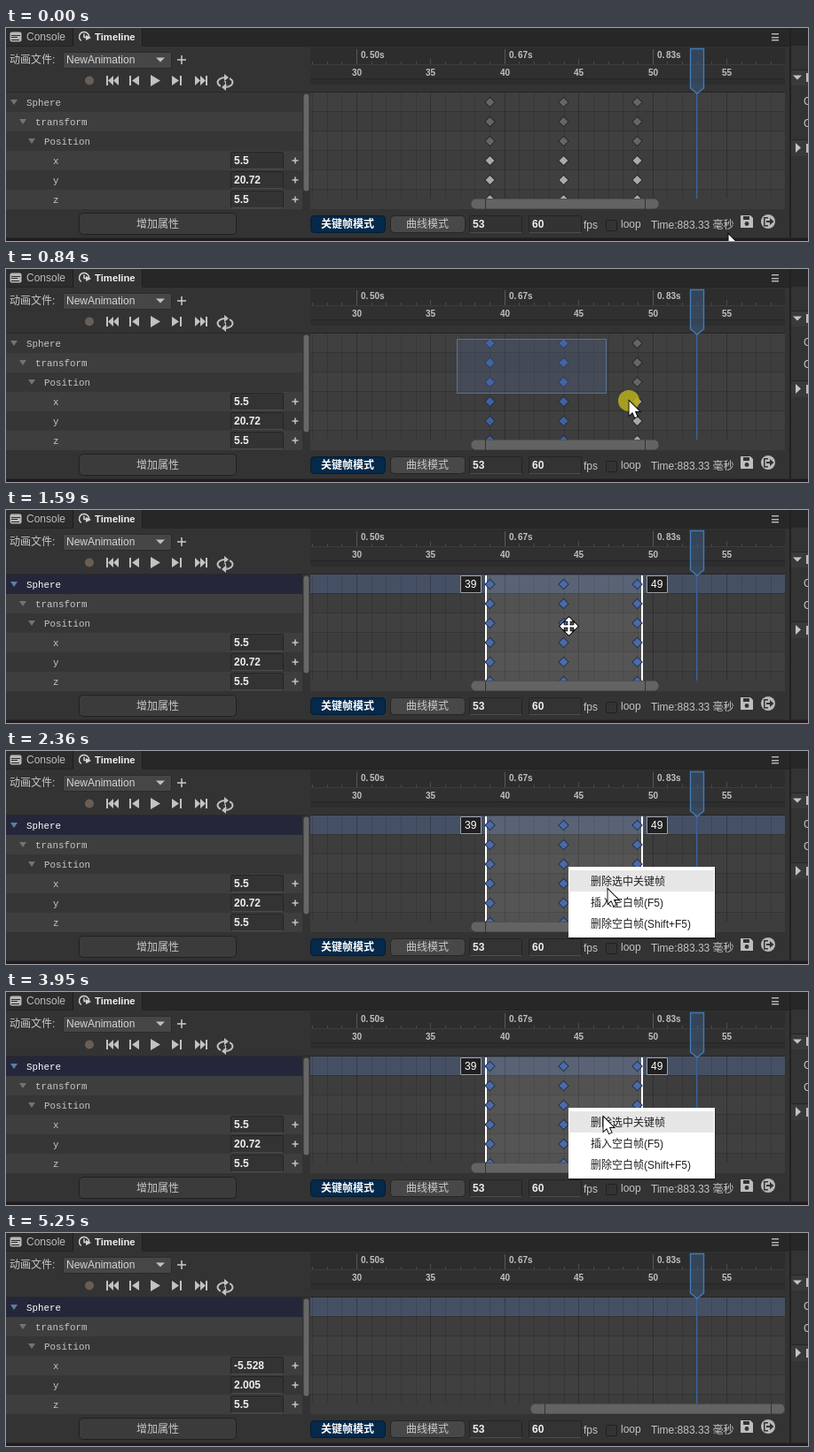
An HTML page with a canvas for the animation above (5800 ms loop, 904 px wide and 241 px high).

```html
<!DOCTYPE html>
<html lang="zh">
<head>
<meta charset="utf-8">
<title>Timeline</title>
<style>
html, body { margin: 0; width: 100%; height: 100%; overflow: hidden; background: #333; }
canvas { display: block; }
</style>
</head>
<body>
<canvas id="stage" width="904" height="241"></canvas>
<script>
const ctx = document.getElementById('stage').getContext('2d');
const LOOP = 5800;
const SANS = '"Liberation Sans", "Noto Sans CJK SC", "Noto Sans CJK", sans-serif';
const MONO = '"Liberation Mono", monospace';
const BOLD = 'bold 12px ' + SANS;
const SMALL = 'bold 10px ' + SANS;
const ROW = 22, TOP = 73, LEFT = 343, RIGHT = 878, BOTTOM = 193;
const KEYS = [39, 44, 49];
const START = { x: 509, y: 80 };
const MENU = { x: 634, y: 131, w: 165, h: 80 };
const ITEMS = ['删除选中关键帧', '插入空白帧(F5)', '删除空白帧(Shift+F5)'];
const T = { press: 600, drag: 700, release: 1050, pick: 1460, menu: 1660, click: 4250, remove: 4430, out: 5250 };

// pointer way points: time, x, y
const PATH = [
  [0, 814, 233], [70, 814, 233], [560, 509, 80], [700, 509, 80], [840, 702, 149],
  [980, 764, 182], [1050, 764, 182], [1390, 634, 131], [2010, 634, 131],
  [2360, 678, 156], [2440, 678, 156], [2570, 674, 165], [3050, 667, 191],
  [3670, 667, 191], [3950, 673, 141], [4430, 673, 141], [4770, 617, 176],
  [4980, 680, 205], [5250, 808, 243]
];

const frameX = f => 395 + 16.68 * (f - 30);

function pointerAt(t) {
  let i = 1;
  while (i < PATH.length - 1 && PATH[i][0] < t) i++;
  const [t0, x0, y0] = PATH[i - 1], [t1, x1, y1] = PATH[i];
  const u = Math.max(0, Math.min(1, (t - t0) / (t1 - t0)));
  const s = u * u * (3 - 2 * u);
  return { x: x0 + (x1 - x0) * s, y: y0 + (y1 - y0) * s };
}

function rect(x, y, w, h, fill) {
  ctx.fillStyle = fill;
  ctx.fillRect(x, y, w, h);
}

function box(x, y, w, h, r, fill, line) {
  ctx.beginPath();
  ctx.roundRect(x + .5, y + .5, w - 1, h - 1, r);
  if (fill) { ctx.fillStyle = fill; ctx.fill(); }
  if (line) { ctx.strokeStyle = line; ctx.lineWidth = 1; ctx.stroke(); }
}

function poly(points, fill, line, width = 1) {
  ctx.beginPath();
  for (let i = 0; i < points.length; i += 2) ctx.lineTo(points[i], points[i + 1]);
  ctx.closePath();
  if (line) { ctx.strokeStyle = line; ctx.lineWidth = width; ctx.stroke(); }
  if (fill) { ctx.fillStyle = fill; ctx.fill(); }
}

function disc(x, y, r, fill) {
  ctx.fillStyle = fill;
  ctx.beginPath();
  ctx.arc(x, y, r, 0, 7);
  ctx.fill();
}

function text(str, x, y, color = '#c4c4c4', font = '12px ' + SANS) {
  ctx.font = font;
  ctx.fillStyle = color;
  ctx.fillText(str, x, y);
}

function plus(x, y, r, w, color) {
  rect(x - r, y - w / 2, 2 * r, w, color);
  rect(x - w / 2, y - r, w, 2 * r, color);
}

function caret(x, y, r, h, color) {
  poly([x - r, y - h / 2, x + r, y - h / 2, x, y + h / 2], color);
}

function field(x, y, w, value) {
  box(x, y, w, 20, 1, '#333', '#242424');
  rect(x + 1, y + 19, w - 2, 1, '#4c4c4c');
  text(value, x + 4, y + 14, '#eee', BOLD);
}

function clip(x, y, w, h, draw) {
  ctx.save();
  ctx.beginPath();
  ctx.rect(x, y, w, h);
  ctx.clip();
  draw();
  ctx.restore();
}

function tabs() {
  rect(0, 0, 904, 20, '#272727');
  rect(0, 0, 76, 20, '#2c2c2c');
  rect(76, 0, 77, 21, '#333');
  rect(75, 0, 1, 20, '#1d1d1d');
  rect(153, 0, 1, 20, '#1d1d1d');
  rect(154, 20, 729, 1, '#232323');
  rect(0, 20, 76, 1, '#232323');
  box(4, 4, 14, 12, 2, '#b8b8b8');
  rect(6, 8, 10, 1, '#2c2c2c');
  rect(6, 10, 7, 1, '#2c2c2c');
  rect(6, 13, 9, 1, '#2c2c2c');
  text('Console', 23, 14, '#bcbcbc');
  ctx.strokeStyle = '#d4d4d4';
  ctx.lineWidth = 1.5;
  ctx.beginPath();
  ctx.arc(88, 10, 5.5, 2.2, 6.6);
  ctx.moveTo(88, 6.5);
  ctx.lineTo(88, 10.5);
  ctx.lineTo(92, 10.5);
  ctx.stroke();
  poly([90, 8, 96, 11, 90, 14], '#d4d4d4');
  text('Timeline', 100, 14, '#f0f0f0', 'bold 11.3px ' + SANS);
  for (const y of [6, 10, 13]) rect(863, y, 8, 1.5, '#b4b4b4');
}

function transport() {
  const c = '#c2c2c2';
  const tri = (x, d, w = 7) => poly([x, 54, x + d * w, 59.5, x, 65], c);
  text('动画文件:', 4, 40, '#c8c8c8');
  box(64, 27, 123, 19, 2, '#464646', '#2b2b2b');
  text('NewAnimation', 68, 40, '#d6d6d6');
  caret(174, 36, 5, 5, '#c0c0c0');
  plus(198, 36, 5, 1.5, '#cacaca');
  disc(94, 59.5, 5, '#695e55');
  rect(113, 54, 2, 11, c); tri(121, -1, 6); tri(127, -1, 6);
  rect(139, 54, 2, 11, c); tri(150, -1, 8);
  poly([163, 53, 174, 59.5, 163, 66], c);
  tri(187, 1, 8); rect(196, 54, 2, 11, c);
  tri(213, 1, 6); tri(219, 1, 6); rect(225, 54, 2, 11, c);
  ctx.strokeStyle = c;
  ctx.lineWidth = 2;
  for (const a of [2.2, 5.35]) {
    ctx.beginPath();
    ctx.ellipse(247, 61.5, 8.5, 5.5, 0, a, a + 2.5);
    ctx.stroke();
  }
  poly([246, 52, 251, 56, 246, 60], c);
  poly([248, 63, 243, 67, 248, 71], c);
  text('1', 245, 65, c, 'bold 8px ' + SANS);
}

function tree(picked, removed) {
  const values = removed ? ['-5.528', '2.005', '5.5'] : ['5.5', '20.72', '5.5'];
  const names = ['Sphere', 'transform', 'Position', 'x', 'y', 'z'];
  rect(0, 72, 342, 1, '#292929');
  clip(0, TOP, 342, 132, () => {
    names.forEach((name, i) => {
      const y = TOP + i * ROW, on = picked && i === 0;
      rect(0, y, 334, ROW, on ? '#24273a' : i % 2 ? '#3e3e3e' : '#363636');
      const x = i < 3 ? 23 + 10 * i : 53;
      text(name, x, y + 15, on ? '#fff' : '#c6c6c6', '10.83px ' + MONO);
      if (i < 3) return caret(9 + 10 * i, y + 11, 4, 6, on ? '#5c7f9f' : '#737373');
      field(253, y + 1, 60, values[i - 3]);
      plus(326, y + 11, 3.5, 1.5, '#c4c4c4');
    });
  });
  box(335, 74, 7, 111, 3, '#676767');
}

function ruler() {
  rect(LEFT, 22, RIGHT - LEFT, 20, '#2d2d2d');
  rect(LEFT, 42, RIGHT - LEFT, 16, '#303030');
  rect(LEFT, 57, RIGHT - LEFT, 16, '#2d2d2d');
  rect(LEFT, 57, RIGHT - LEFT, 1, '#252525');
  rect(LEFT, 64, RIGHT - LEFT, 8, '#333');
  rect(LEFT, 72, RIGHT - LEFT, 1, '#252525');
  for (let f = 27; f < 59; f++) {
    const x = Math.round(frameX(f)), major = f % 10 === 0, mid = f % 5 === 0;
    const y = major ? 24 : mid ? 35 : 38;
    rect(x, y, 1, 42 - y, major ? '#585858' : '#4c4c4c');
    if (mid) text(String(f), x - 5, 54, '#c0c0c0', SMALL);
    if (major) {
      text('0.', x + 5, 34, '#c0c0c0', SMALL);
      text((f / 60).toFixed(2).slice(2) + 's', x + 15, 34, '#c0c0c0', SMALL);
    }
  }
  rect(LEFT, 41, RIGHT - LEFT, 1, '#3c3c3c');
}

function grid(picked) {
  for (let i = 0; i < 6; i++) {
    const y = TOP + i * ROW;
    rect(LEFT, y, RIGHT - LEFT, ROW, picked && !i ? '#455064' : i % 2 ? '#3d3d3d' : '#404040');
    rect(LEFT, y + ROW - 1, RIGHT - LEFT, 1, '#343434');
  }
  for (let f = 27; f < 59; f++) {
    const strong = f % 5 === 0;
    rect(Math.round(frameX(f)), TOP, 1, BOTTOM - TOP, strong ? 'rgba(0,0,0,.24)' : 'rgba(0,0,0,.12)');
  }
}

function keys(isOn, blue) {
  for (const f of KEYS) {
    const x = Math.floor(frameX(f)) + .5;
    for (let i = 0; i < 6; i++) {
      const y = TOP + 11 + i * ROW, on = isOn(x);
      const fill = on ? blue : i < 3 ? '#656565' : '#a9a9a9';
      poly([x, y - 5, x + 5, y, x, y + 5, x - 5, y], fill, on ? '#202f4c' : '#262626', 1.8);
    }
  }
}

function range() {
  rect(541, 74, 176, BOTTOM - 74, 'rgba(255,255,255,.11)');
  rect(540, 74, 2, BOTTOM - 74, '#fff');
  rect(716, 74, 2, BOTTOM - 74, '#fff');
  for (const [x, label] of [[512, '39'], [722, '49']]) {
    box(x, 74, 24, 20, 0, '#202020', '#a0a0a0');
    text(label, x + 5, 88, '#fff');
  }
}

function playhead() {
  const head = [771.5, 23.5, 786.5, 23.5, 786.5, 68, 779, 74, 771.5, 68];
  rect(778, 74, 1.5, BOTTOM - 74, '#3a649a');
  poly(head, 'rgba(66,115,170,.36)');
  poly(head, null, '#447ab4', 1.4);
}

function scrollbar(x0, x1) {
  rect(LEFT, BOTTOM, RIGHT - LEFT, 12, '#3d3d3d');
  box(x0, BOTTOM, x1 - x0, 12, 5, '#636363');
  for (const x of [x0 + 16, x1 - 16]) rect(x, BOTTOM, 1, 12, '#333');
}

function footer() {
  box(82, 209, 178, 25, 4, '#3b3b3b', '#202020');
  text('增加属性', 147, 226, '#c8c8c8');
  box(343, 212, 85, 20, 4, '#05294a', '#031c33');
  text('关键帧模式', 355, 226, '#fff', BOLD);
  box(433, 212, 85, 20, 4, '#484848', '#252525');
  text('曲线模式', 451, 226, '#c8c8c8');
  field(522, 212, 60, '53');
  field(589, 212, 60, '60');
  text('fps', 651, 227);
  box(676, 217, 13, 13, 1, '#333', '#1f1f1f');
  text('loop', 693, 226);
  text('Time:883.33 毫秒', 727, 227);
  poly([828, 212, 839, 212, 842, 215, 842, 226, 828, 226], '#bebebe');
  rect(831, 213, 7, 4, '#333');
  disc(835, 221.5, 2.4, '#333');
  disc(859, 219, 8, '#b8b8b8');
  rect(854, 214, 5, 1.5, '#333');
  rect(854, 214, 1.5, 10, '#333');
  rect(854, 223, 5, 1.5, '#333');
  rect(857, 218, 5, 2, '#333');
  poly([861, 215, 865.5, 219, 861, 223], '#333');
}

function sidePanel() {
  rect(883, 0, 2, 238, '#212121');
  rect(885, 21, 19, 217, '#333');
  rect(885, 47, 19, 1, '#252525');
  rect(885, 48, 19, 17, '#3a3a3a');
  rect(885, 126, 19, 1, '#252525');
  rect(885, 127, 19, 18, '#3a3a3a');
  caret(892, 56, 5, 5, '#c4c4c4');
  poly([890, 130, 896, 135.5, 890, 141], '#c4c4c4');
  text('C', 899, 87);
  text('C', 899, 112);
  rect(902, 51, 2, 10, '#bcbcbc');
  rect(902, 131, 2, 10, '#bcbcbc');
  rect(0, 237, 904, 1, '#282828');
  rect(0, 238, 904, 3, '#211b20');
}

function menu(p) {
  rect(MENU.x + 1, MENU.y + 1, MENU.w, MENU.h + 1, 'rgba(0,0,0,.3)');
  rect(MENU.x, MENU.y, MENU.w, MENU.h, '#fff');
  const hover = p.x > MENU.x + 1 ? Math.floor((p.y - MENU.y - 4) / 24) : -1;
  ITEMS.forEach((item, i) => {
    const y = MENU.y + 4 + i * 24;
    if (i === hover) rect(MENU.x + 1, y, MENU.w - 2, 24, '#e6e6e6');
    text(item, 659, y + 17, '#202020');
  });
}

function arrow(p) {
  const shape = [0, 0, 0, 16, 3.7, 12.5, 6.4, 18.5, 9, 17.4, 6.4, 11.6, 11.5, 11.6];
  ctx.save();
  ctx.translate(p.x + .5, p.y + .5);
  poly(shape, '#fff', '#000', 1.8);
  ctx.restore();
}

function moveCross(p) {
  const arm = [-1, 1, -1, -6, -4, -6, 0, -10, 4, -6, 1, -6, 1, 1];
  for (const line of ['#000', null]) {
    for (let i = 0; i < 4; i++) {
      ctx.save();
      ctx.translate(p.x + .5, p.y + .5);
      ctx.rotate(i * Math.PI / 2);
      poly(arm, '#fff', line, 2);
      ctx.restore();
    }
  }
}

function draw(t) {
  // the drag moves in coarse steps
  const q = t < 1120 ? Math.floor(t / 70) * 70 : t;
  const p = pointerAt(q), corner = pointerAt(q - 32);
  const removed = t >= T.remove, picked = t >= T.pick;
  const dragging = t >= T.drag && t < T.release;
  const ranged = t >= T.release && !removed;
  const menuOpen = t >= T.menu && !removed;

  rect(0, 0, 904, 241, '#333');
  tabs();
  transport();
  tree(picked, removed);
  ruler();
  clip(LEFT, TOP, RIGHT - LEFT, BOTTOM - TOP, () => {
    grid(picked);
    if (ranged) range();
    if (!removed) keys(x => ranged || (dragging && x < corner.x), dragging ? '#3f629c' : '#4b6aa6');
    if (dragging) {
      const w = Math.round(corner.x - START.x), h = Math.round(corner.y - START.y);
      if (w > 1 && h > 1) box(START.x - 1, START.y - 1, w + 2, h + 2, 0, 'rgba(85,110,155,.25)', '#587299');
    }
  });
  playhead();
  if (removed) scrollbar(591, 878);
  else scrollbar(524, 736);
  footer();
  sidePanel();
  if (menuOpen) menu(p);

  if (t >= T.out) return;
  if ((t >= T.press && t < T.release) || (t >= T.click && t < T.remove)) {
    disc(p.x, p.y, 12, 'rgba(180,172,28,.88)');
  }
  if (ranged && !menuOpen && p.x > 541 && p.x < 717) moveCross(p);
  else arrow(p);
}

function tick(now) {
  draw(now % LOOP);
  requestAnimationFrame(tick);
}
draw(0);
requestAnimationFrame(tick);
</script>
</body>
</html>
```
